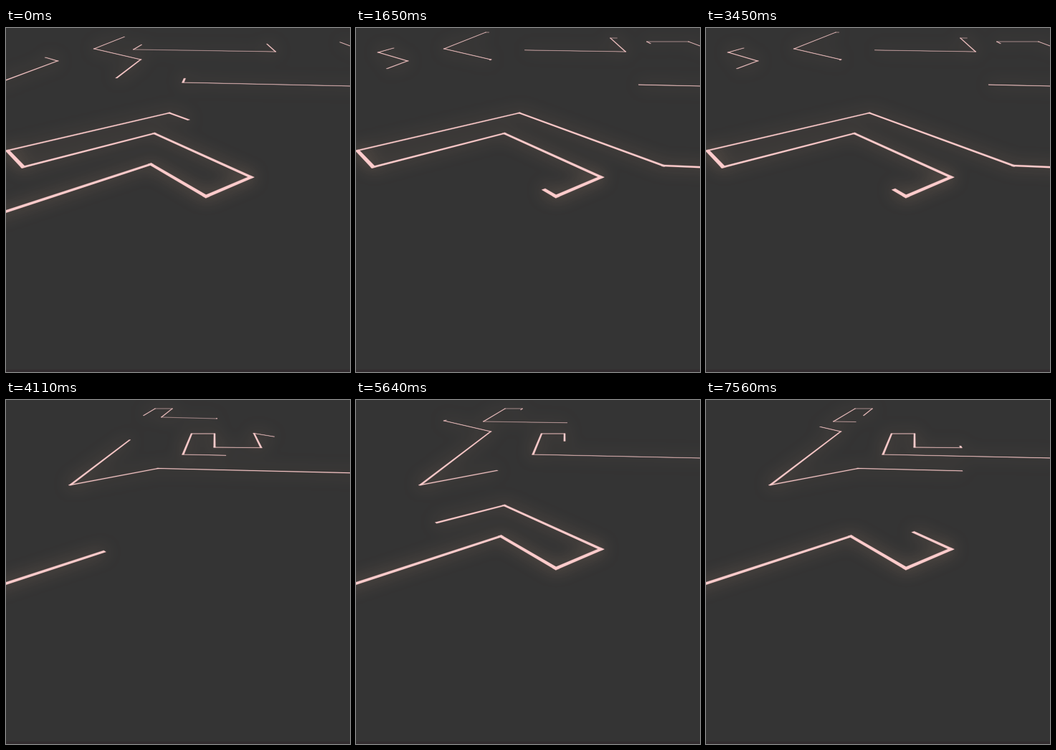
An HTML page that plays this animation: 480x480 px, repeating every 7.59 s.

```html
<!DOCTYPE html>
<html lang="en">
<head>
<meta charset="utf-8">
<title>Light traces</title>
<style>
  html, body { margin: 0; width: 100%; height: 100%; overflow: hidden; background: #343434; }
  svg { display: block; width: 100vw; height: 100vh; }
</style>
</head>
<body>
<svg viewBox="0 0 480 480">
  <defs>
    <filter id="glow" filterUnits="userSpaceOnUse" x="-60" y="-60" width="600" height="600"
            color-interpolation-filters="sRGB">
      <feDropShadow dx="0" dy="0" stdDeviation="11" flood-color="#ffc8a0" flood-opacity="0.5"/>
    </filter>
    <!-- Routes across the floor as seen on screen; data-enter is the time a light reaches the start -->
    <g id="routes">
      <polyline data-enter="573" points="720,119 266,107 547,197 429,192 228,118.5 2,171 24,194
        207,147 342,208 279,235 202,190 -150,305"/>
      <polyline data-enter="505" points="294,26 293,7 181,6 123,29 188,44 90,118.5 212,95.5 620,105"/>
      <polyline data-enter="1471" points="620,84 247,76 259,47 291,47 291,66 356,66.5 346,46.5
        504,73 406,19 464,19 560,55"/>
      <polyline data-enter="797" data-pace="1.1" data-lag="388" points="343,41 422,42 378,14 355,14
        376,33 178,30 208,12 232,12 217,24 294,26"/>
      <polyline data-enter="605" data-pace="0.7" points="108,45 62,33 107,19 77,21 31,34 72,46 -60,95"/>
    </g>
  </defs>
  <rect width="480" height="480" fill="#343434"/>
  <rect y="476.5" width="480" height="3.5" fill="#322c2f"/>
  <path id="line" fill="#ffcccc" stroke="#ffcccc" stroke-opacity="0.3" filter="url(#glow)"/>
</svg>
<script>
const LOOP = 7590, CYCLE = 1800, STEP = 30;
const SPEED = 9.79, LAG = 587, HALF_WIDTH = 12;
const HORIZON = -42, CENTER = 240, DEPTH = 566000;

// Screen <-> floor plane seen in perspective
const toFloor = ({ x, y }) => ({ u: 1000 * (x - CENTER) / (y - HORIZON), v: DEPTH / (y - HORIZON) });
const toScreen = ({ u, v }) => {
  const scale = DEPTH / v;
  return `${(CENTER + u * scale / 1000).toFixed(2)} ${(HORIZON + scale).toFixed(2)}`;
};

function readRoute(polyline) {
  const { enter, pace = 1, lag = LAG } = polyline.dataset;
  const corners = Array.from(polyline.points, toFloor);
  let start = 0;
  const segments = corners.slice(1).map((b, i) => {
    const a = corners[i];
    const length = Math.hypot(b.u - a.u, b.v - a.v);
    const segment = { a, start, length, du: (b.u - a.u) / length, dv: (b.v - a.v) / length };
    start += length;
    return segment;
  });
  return { enter: +enter, pace: +pace, lag: +lag, segments };
}

const routes = Array.from(document.querySelectorAll("#routes polyline"), readRoute);
const line = document.getElementById("line");

// Flat strip on the floor, lengthened by half its width so that corners close
function strip({ a, du, dv }, from, to) {
  const corner = (along, side) => toScreen({
    u: a.u + du * along - dv * side,
    v: a.v + dv * along + du * side
  });
  const back = from - HALF_WIDTH, front = to + HALF_WIDTH;
  return "M" + [
    corner(back, -HALF_WIDTH), corner(front, -HALF_WIDTH),
    corner(front, HALF_WIDTH), corner(back, HALF_WIDTH)
  ].join("L") + "Z";
}

function routeShape({ enter, pace, lag, segments }, time) {
  const head = SPEED * pace * (time - enter) - HALF_WIDTH;
  const tail = SPEED * (time - enter - lag) + HALF_WIDTH;
  return segments.map(segment => {
    const from = Math.max(0, tail - segment.start);
    const to = Math.min(segment.length, head - segment.start);
    return to > from ? strip(segment, from, to) : "";
  }).join("");
}

function draw(ms) {
  const time = Math.floor(ms % LOOP / STEP) * STEP % CYCLE;
  let shape = "";
  for (const route of routes) {
    for (let lap = 0; lap < 3; lap++) shape += routeShape(route, time + lap * CYCLE);
  }
  line.setAttribute("d", shape);
}

const began = performance.now();
function tick() {
  draw(performance.now() - began);
  requestAnimationFrame(tick);
}
tick();
</script>
</body>
</html>
```
